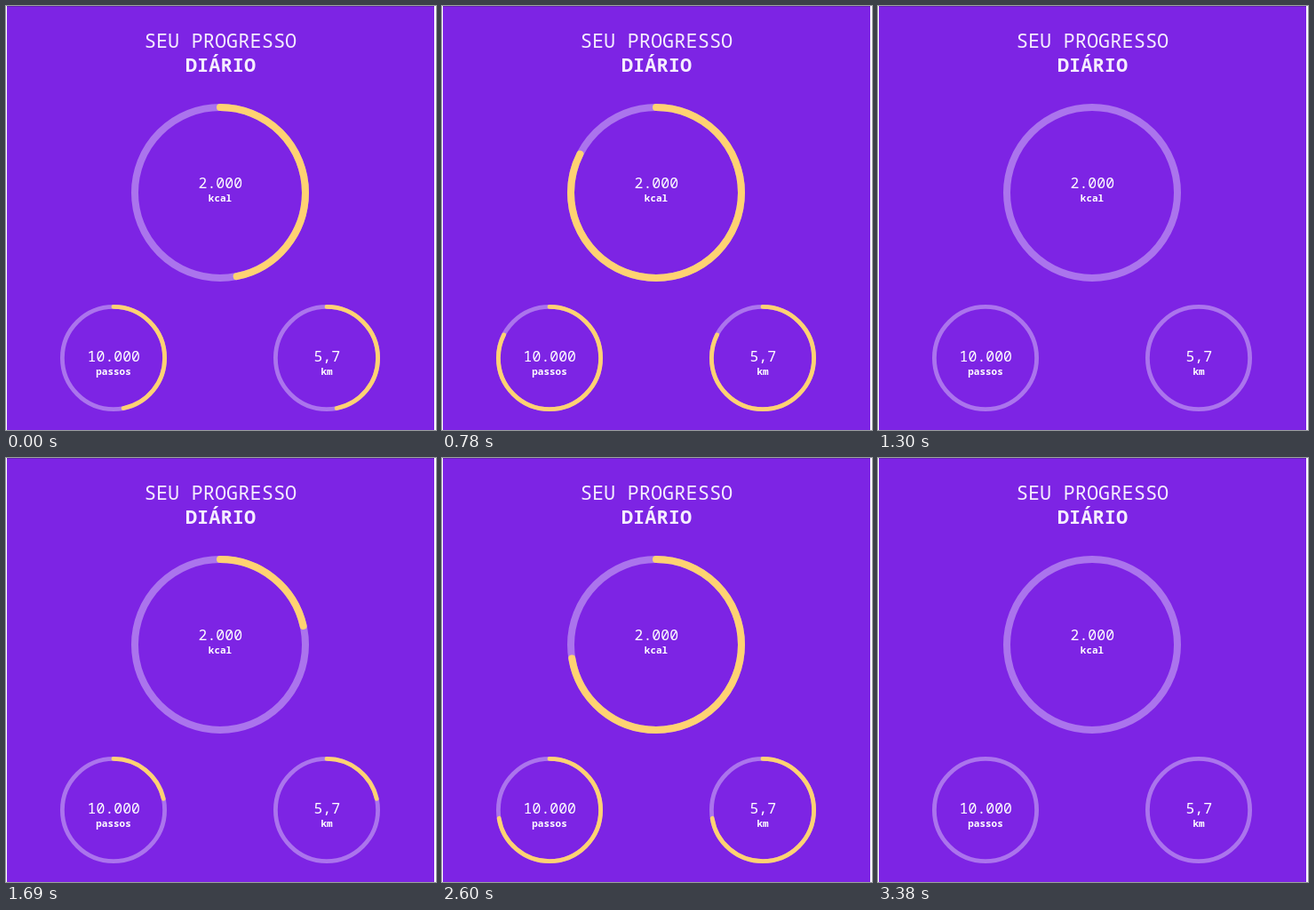
Animation of 484x477 px, one loop 3510 ms. Source, as an HTML page:

```html
<!DOCTYPE html>
<html lang="pt-BR">
<head>
<meta charset="utf-8">
<title>Seu progresso diário</title>
<style>
  html, body { margin: 0; width: 100%; height: 100%; overflow: hidden; background: #fff; }
  svg { display: block; width: 484px; height: 477px; }
  text { font-family: "Noto Sans Mono", "DejaVu Sans Mono", monospace; text-anchor: middle; fill: #fff; }
  .title { font-size: 22px; fill: #f5edfe; }
  .value { font-size: 16.5px; }
  .unit { font-size: 11px; }
  .title.strong, .unit { font-weight: 700; }
  circle { fill: none; stroke-width: 8; }
  .track { stroke: #ab74ed; }
  .bar { stroke: #ffd272; stroke-linecap: round; }
</style>
</head>
<body>
<svg id="stage" viewBox="0 0 484 477">
  <rect x="1" width="481" height="477" fill="#7d24e4"/>
  <rect x="1" width="481" height="1" fill="#6420b8"/>
  <text class="title" x="241.5" y="46.5">SEU PROGRESSO</text>
  <text class="title strong" x="241.5" y="74">DIÁRIO</text>
</svg>
<script>
const STEP = 130, STEPS = 27;
const START_PHASE = 0.39, PHASE_PER_STEP = 0.0621;
const HIDDEN = 0.09; // share of the sweep spent before the bar shows
const RADIUS = 96;

const gauges = [
  { x: 241, y: 210, scale: 1, value: "2.000", unit: "kcal", baseline: 205 },
  { x: 121, y: 396, scale: 0.6, value: "10.000", unit: "passos", baseline: 399.5 },
  { x: 361, y: 396, scale: 0.6, value: "5,7", unit: "km", baseline: 399.5 },
];

const gaugeMarkup = g => `
  <g transform="translate(${g.x} ${g.y}) scale(${g.scale})">
    <circle class="track" r="${RADIUS}"/>
    <circle class="bar" r="${RADIUS}" pathLength="1" transform="rotate(-90)"/>
  </g>
  <text class="value" x="${g.x + 0.3}" y="${g.baseline}">${g.value}</text>
  <text class="unit" x="${g.x}" y="${g.baseline + 15.3}">${g.unit}</text>`;

const stage = document.getElementById("stage");
stage.insertAdjacentHTML("beforeend", gauges.map(gaugeMarkup).join(""));
const bars = stage.querySelectorAll(".bar");

// cubic-bezier(0, 0, .58, 1), solved by bisection
function easeOut(x) {
  let low = 0, high = 1;
  for (let i = 0; i < 24; i++) {
    const s = (low + high) / 2;
    if (1.74 * s * s - 0.74 * s ** 3 < x) low = s;
    else high = s;
  }
  return 3 * low * low - 2 * low ** 3;
}

function draw(time) {
  const step = Math.floor(time / STEP) % STEPS;
  const phase = (START_PHASE + step * PHASE_PER_STEP) % 1;
  const progress = easeOut(phase) - HIDDEN;
  for (const bar of bars) {
    bar.style.display = progress > 0 ? "" : "none";
    bar.setAttribute("stroke-dasharray", `${Math.max(progress, 0)} 2`);
  }
}

const start = performance.now();
function tick() {
  draw(performance.now() - start);
  requestAnimationFrame(tick);
}
tick();
</script>
</body>
</html>
```
